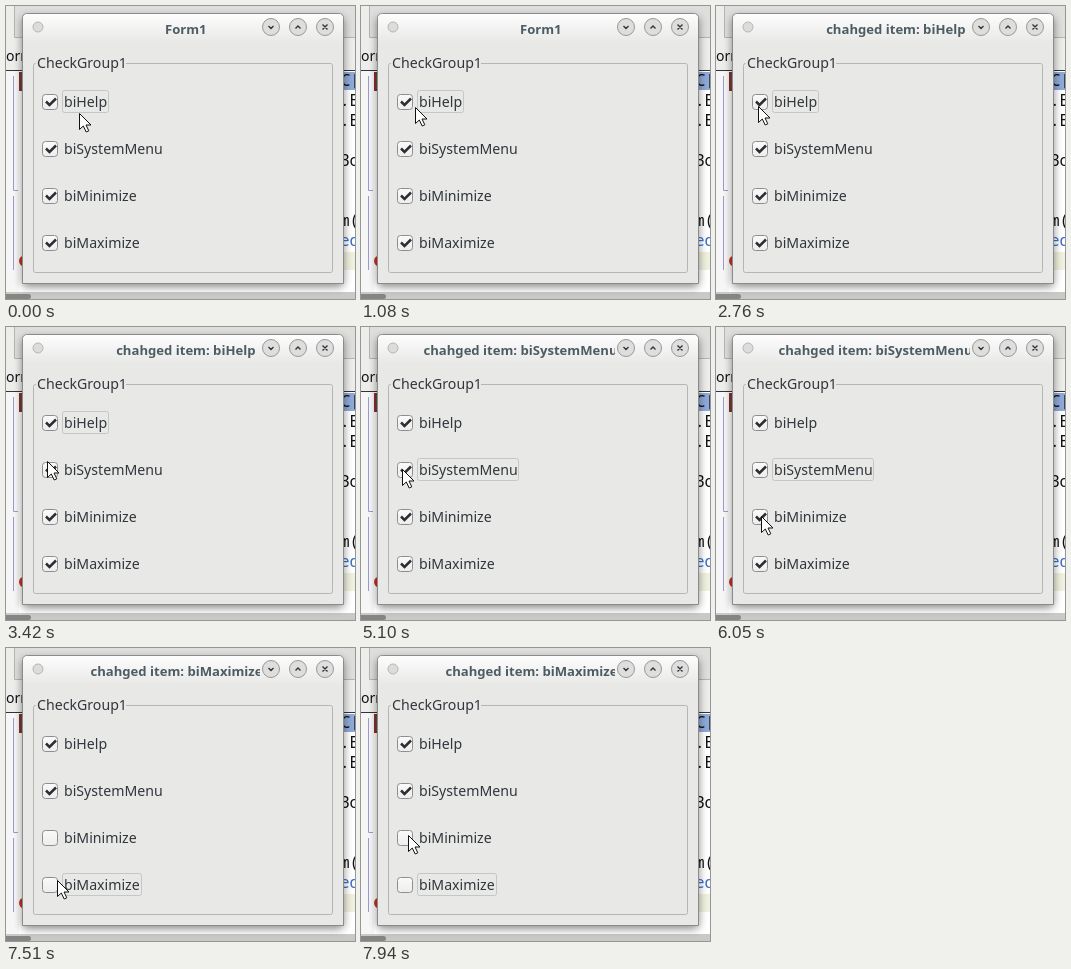
These frames come from a looping animation (349x293 px, 8000 ms). An HTML page:

```html
<!DOCTYPE html>
<html lang="en">
<head>
<meta charset="utf-8">
<title>Check group</title>
<style>
  html, body { margin: 0; height: 100%; overflow: hidden; }
  svg { display: block; }
  text { font: 14.15px "Noto Sans", sans-serif; fill: #31363b; white-space: pre; }
  #title { font-weight: 600; font-size: 13.1px; fill: #4d5c63; }
  .code text { font: 16px "Noto Sans Mono", monospace; fill: #111; }
  .line { fill: none; stroke: #31363b; stroke-width: 1.4; }
</style>
</head>
<body>
<svg width="349" height="293" viewBox="0 0 349 293">
  <defs>
    <linearGradient id="bar" x2="0" y2="1">
      <stop stop-color="#fdfdfd"/><stop offset="1" stop-color="#e8e8e7"/>
    </linearGradient>
    <linearGradient id="box" x2="0" y2="1">
      <stop stop-color="#fafafa"/><stop offset="1" stop-color="#ededed"/>
    </linearGradient>
    <filter id="blur" x="-10%" y="-10%" width="120%" height="120%"><feGaussianBlur stdDeviation="4"/></filter>
    <clipPath id="titleClip"><rect x="45" y="8" width="209" height="28"/></clipPath>
  </defs>

  <g class="code">
    <rect width="349" height="293" fill="#ededec"/>
    <path d="M8.500 -1V31.500H350V-1Z" fill="#dededd" stroke="#b4b4b3"/>
    <rect y="65" width="349" height="221" fill="#fff"/>
    <rect y="65" width="13" height="221" fill="#f6f6f6"/>
    <path d="M0 64.500H349" stroke="#333"/>
    <path d="M7.500 70V184.500H12M7.500 190V264" fill="none" stroke="#9a9ad2"/>
    <rect x="14" y="67" width="5" height="17" fill="#555" stroke="#8c2f2a" stroke-width="2"/>
    <circle cx="18.500" cy="255" r="5.500" fill="#c83228"/>
    <rect x="330" y="66" width="19" height="18" fill="#8fa9d8"/>
    <rect x="330" y="246" width="19" height="18" fill="#f0f0de"/>
    <text y="55" style="font:14px 'Noto Sans',sans-serif">orm</text>
    <text x="335" y="80">C[</text>
    <text x="334" y="100">.E</text>
    <text x="334" y="120">.E</text>
    <text x="334" y="160">Bo</text>
    <text x="334" y="220">m(</text>
    <text x="334" y="240" style="fill:#3a6fd0">ed</text>
    <rect y="286" width="349" height="7" fill="#c9c9c8"/>
    <rect x="-6" y="288" width="31" height="5" rx="2.500" fill="#858584"/>
  </g>

  <rect x="16" y="11" width="322" height="270" rx="5" opacity=".45" filter="url(#blur)"/>
  <path d="M16.500 277.500V12.500Q16.500 7.500 21.500 7.500H332.500Q337.500 7.500 337.500 12.500V277.500Z" fill="#e8e8e7" stroke="#8b8b8a"/>
  <path d="M17 37V12.500Q17 8 21.500 8H332.500Q337 8 337 12.500V37Z" fill="url(#bar)"/>
  <circle cx="32" cy="21" r="5" fill="#dcdcdb" stroke="#b6b6b5"/>
  <g fill="#dededd" stroke="#989897">
    <circle cx="265" cy="21" r="8.500"/><circle cx="292" cy="21" r="8.500"/><circle cx="319" cy="21" r="8.500"/>
  </g>
  <path class="line" d="M262.500 20l2.500 2.500 2.500-2.500M289.500 22.500l2.500-2.500 2.500 2.500M316.500 18.500l5 5m0-5l-5 5"/>
  <g clip-path="url(#titleClip)"><text id="title" y="28"></text></g>

  <path d="M30 57.500H29.500Q27.500 57.500 27.500 59.500V264.500Q27.500 266.500 29.500 266.500H324.500Q326.500 266.500 326.500 264.500V59.500Q326.500 57.500 324.500 57.500H120" fill="none" stroke="#b5b5b4"/>
  <text x="31" y="62">CheckGroup1</text>
  <g id="rows"></g>
  <rect id="focus" x="56.500" height="22" rx="2" fill="none" stroke="#c6c6c5"/>
  <path id="cursor" d="M.5 .5V16.500L4.300 13 7.200 19 9.800 17.800 7 12H12Z" fill="#fff" stroke="#111" stroke-linejoin="round"/>
</svg>

<script>
const $ = id => document.getElementById(id);
const LOOP = 8000;
const names = ["biHelp", "biSystemMenu", "biMinimize", "biMaximize"];
const focusWidths = [46, 101, 76, 79];
const rowY = i => 96 + 47 * i;

// [time, row toggled]
const clicks = [[1590, 0], [2320, 0], [3860, 1], [5100, 1], [6260, 2], [7430, 3]];

// [first step, last step, step count, x, y]
const moves = [
  [70, 200, 3, 66, 104],
  [930, 1300, 6, 42, 97],
  [2680, 2760, 2, 42, 100],
  [2980, 3200, 4, 41, 129],
  [3340, 3640, 5, 41, 142],
  [5460, 5680, 4, 43, 165],
  [5830, 6050, 4, 45, 189],
  [6560, 7360, 12, 51, 232],
  [7650, 7940, 5, 47, 187]
];

$("rows").innerHTML = names.map((name, i) => `
  <g transform="translate(36 ${rowY(i) - 8})">
    <rect x=".5" y=".5" width="15" height="15" rx="3" fill="url(#box)" stroke="#8e8e8d"/>
    <path class="tick" d="M4 7.500L7.500 11 14 4.500" fill="none" stroke="#2b2f33" stroke-width="2.500"/>
    <text x="22" y="13">${name}</text>
  </g>`).join("");
const ticks = document.querySelectorAll(".tick");

function cursorAt(t) {
  let x = 73, y = 107;
  for (const [start, end, count, toX, toY] of moves) {
    if (t < start) break;
    const step = Math.floor((t - start) / (end - start) * (count - 1)) + 1;
    const p = Math.min(1, step / count);
    x += (toX - x) * p;
    y += (toY - y) * p;
  }
  return [Math.round(x), Math.round(y)];
}

function draw(t) {
  const done = clicks.filter(([time]) => time <= t);
  const row = done.length ? done[done.length - 1][1] : 0;
  ticks.forEach((tick, i) => {
    const toggles = done.filter(click => click[1] === i).length;
    tick.style.display = toggles % 2 ? "none" : "";
  });

  $("focus").setAttribute("y", rowY(row) - 11.5);
  $("focus").setAttribute("width", focusWidths[row]);

  // Short titles are centred, long ones end at the buttons.
  $("title").textContent = done.length ? "chahged item: " + names[row] : "Form1";
  $("title").setAttribute("text-anchor", row ? "end" : "middle");
  $("title").setAttribute("x", row ? 256.5 : 179.8);

  $("cursor").setAttribute("transform", `translate(${cursorAt(t)})`);
  $("cursor").style.display = t >= 2100 && t < 2170 ? "none" : "";
}

const begin = performance.now();
function tick() {
  draw((performance.now() - begin) % LOOP);
  requestAnimationFrame(tick);
}
tick();
</script>
</body>
</html>
```
